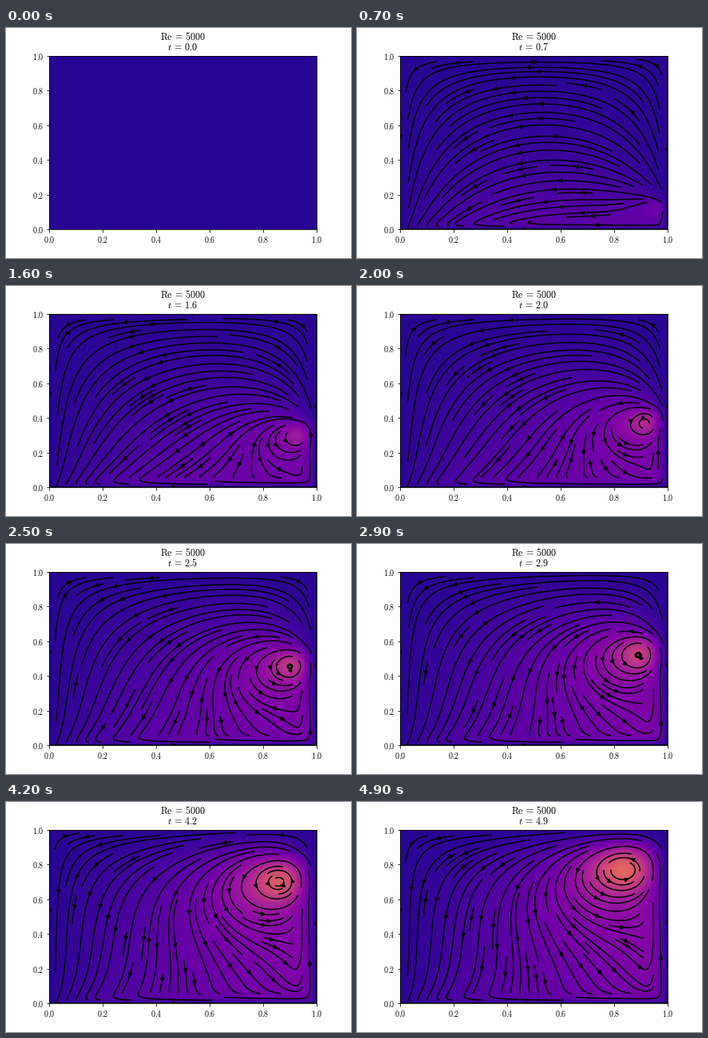
Animation, 432 px wide and 288 px high, one loop 5000 ms. Source, as a matplotlib script:

```python
import numpy as np
import matplotlib.pyplot as plt
from matplotlib.animation import FuncAnimation

plt.rcParams.update({"mathtext.fontset": "cm", "font.size": 10})

# Cavity flow with a moving floor, in vorticity / streamfunction form
RE = 5000
SLIP = 0.05  # slip length of the three resting walls
N = 128
H = 1 / N
FRAMES = 50
STEPS = 40
DT = 0.1 / STEPS

k = np.arange(1, N)
SINES = np.sin(np.pi * np.outer(k, k) / N)
EIGEN = (2 / H * np.sin(np.pi * k / (2 * N))) ** 2
INVERSE = (2 / N) ** 2 / (EIGEN[:, None] + EIGEN[None, :])


def solve_poisson(w):
    psi = np.zeros((N + 1, N + 1))
    spectrum = SINES @ w[1:-1, 1:-1] @ SINES
    psi[1:-1, 1:-1] = SINES @ (spectrum * INVERSE) @ SINES
    return psi


def set_walls(w, psi):
    friction = -2 / (H**2 + 2 * SLIP * H)
    w[0] = -2 * psi[1] / H**2 + 2 / H
    w[-1] = friction * psi[-2]
    w[1:-1, 0] = friction * psi[1:-1, 1]
    w[1:-1, -1] = friction * psi[1:-1, -2]


def advect(speed, far_lo, lo, mid, hi, far_hi):
    """Third-order upwind transport along one axis."""
    slope = far_lo - far_hi + 8 * (hi - lo)
    damping = far_lo + far_hi - 4 * (lo + hi) + 6 * mid
    return (speed * slope + np.abs(speed) * damping) / (12 * H)


def tendency(w, psi):
    p = np.pad(w, 1, mode="reflect", reflect_type="odd")
    xs = [p[2:N + 1, 2 + s:N + 1 + s] for s in range(-2, 3)]
    ys = [p[2 + s:N + 1 + s, 2:N + 1] for s in range(-2, 3)]
    u = (psi[2:, 1:-1] - psi[:-2, 1:-1]) / (2 * H)
    v = (psi[1:-1, :-2] - psi[1:-1, 2:]) / (2 * H)
    laplacian = (xs[1] + xs[3] + ys[1] + ys[3] - 4 * xs[2]) / H**2
    return laplacian / RE - advect(u, *xs) - advect(v, *ys)


def simulate():
    w = np.zeros((N + 1, N + 1))
    psi = np.zeros_like(w)
    states = [psi]
    previous = None
    for _ in range(FRAMES - 1):
        for _ in range(STEPS):
            set_walls(w, psi)
            rate = tendency(w, psi)
            if previous is None:
                previous = rate
            w[1:-1, 1:-1] += DT * (1.5 * rate - 0.5 * previous)
            previous = rate
            psi = solve_poisson(w)
        states.append(psi)
    return states


states = simulate()
grid = np.linspace(0, 1, N + 1)
ticks = np.linspace(0, 1, 6)
labels = [f"${t:.1f}$" for t in ticks]

fig = plt.figure(figsize=(6, 4), dpi=72, facecolor="white")
ax = fig.add_axes([0.125, 0.125, 0.775, 0.755])


def caption(baseline, text=""):
    return fig.text(0.5125, 1 - baseline / 288, text, size=12,
                    ha="center", va="baseline")


caption(15, r"$\mathrm{Re}\,=\,5000$")
clock = caption(28.5)


def draw(frame):
    psi = states[frame]
    ax.clear()
    ax.imshow(psi, cmap="plasma", vmin=-0.005, vmax=0.1,
              extent=(0, 1, 0, 1), origin="lower", aspect="auto",
              interpolation="bilinear")
    if frame:
        psi_y, psi_x = np.gradient(psi, H)
        ax.streamplot(grid, grid, psi_y, -psi_x, color="black")
    ax.set(xlim=(0, 1), ylim=(0, 1))
    ax.set_xticks(ticks, labels)
    ax.set_yticks(ticks, labels)
    clock.set_text(rf"$t\,=\,{frame / 10:.1f}$")


anim = FuncAnimation(fig, draw, frames=FRAMES, interval=100, repeat=True)
plt.show()
```
